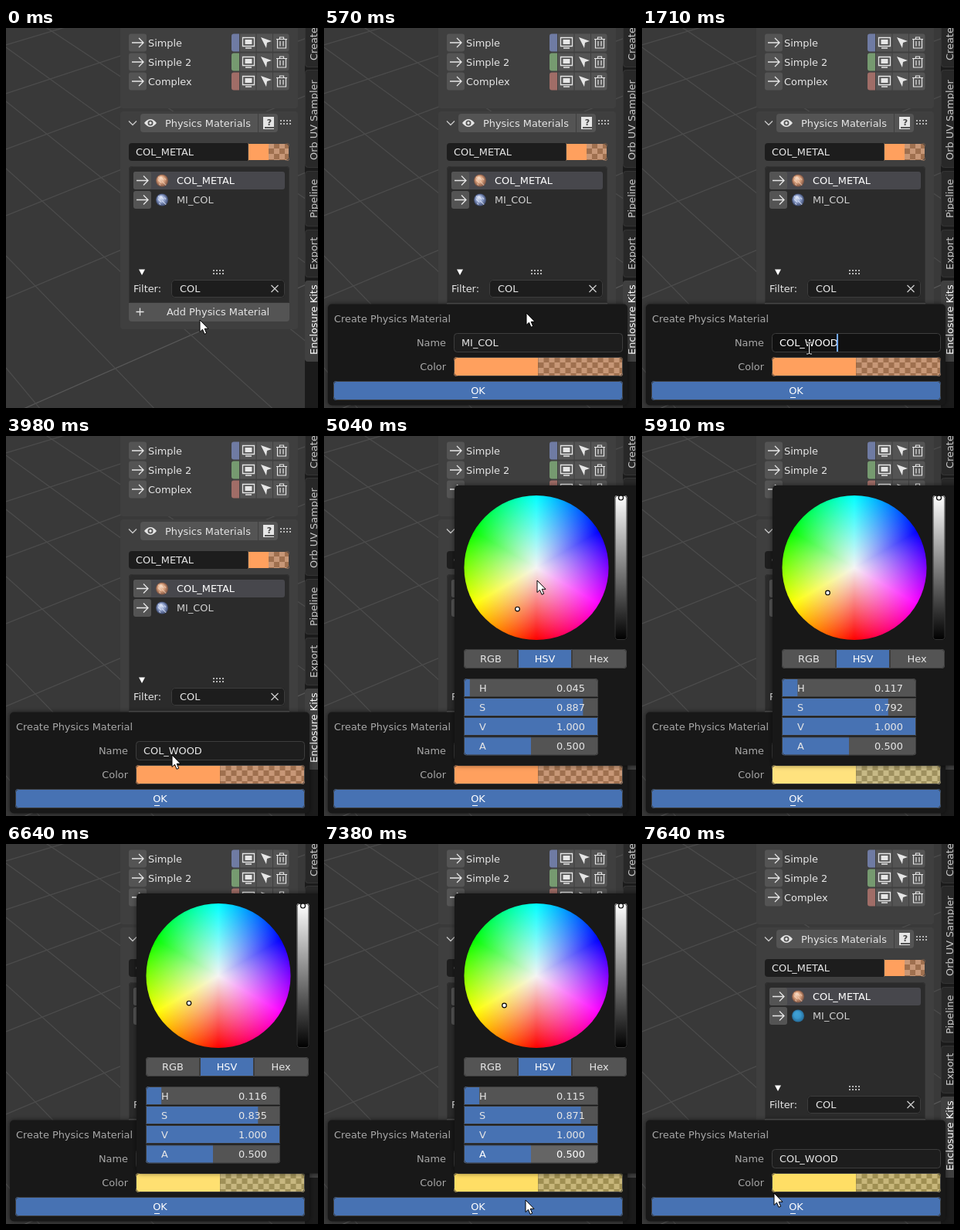
Write an HTML page with a canvas that moves like this. It is 404 by 492 pixels and loops after 8 s.

```html
<!DOCTYPE html>
<html lang="en">
<head>
<meta charset="utf-8">
<title>Create physics material</title>
<style>
html, body { margin: 0; width: 100%; height: 100%; overflow: hidden; background: #393939; }
canvas { display: block; }
</style>
</head>
<body>
<canvas id="stage" width="404" height="492"></canvas>
<script>
const ctx = document.getElementById('stage').getContext('2d');
const LOOP = 8000;
const BLUE = '#4772b3', BUTTON = '#545454', FIELD = '#1d1d1d', OUTLINE = '#3d3d3d';
const TEXT = '#e6e6e6', DIM = '#a8a8a8';
const METAL = { h: .045, s: .887 };

// Each row: start time, values
const cursorSteps = [
  [0, 'arrow', 251, 378], [170, 'arrow', 250, 375], [440, 'arrow', 262, 369],
  [1240, 'arrow', 200, 452], [1440, 'beam', 272, 424], [1710, 'beam', 216, 414],
  [3980, 'arrow', 215, 413], [4640, 'arrow', 213, 435], [5040, 'arrow', 276, 187],
  [5640, 'none'], [7380, 'arrow', 261, 461], [7580, 'arrow', 215, 457], [7640, 'arrow', 171, 452]
];
const colorSteps = [
  [0, .045, .887], [5640, .058, .87], [5710, .075, .85], [5780, .091, .83], [5840, .105, .81],
  [5910, .117, .792], [5980, .119, .785], [6110, .117, .8], [6640, .116, .835], [6780, .115, .871]
];
const nameSteps = [[0, 'MI_COL'], [1440, 'C'], [1710, 'COL_WOOD']];
const at = (steps, t) => steps.findLast(step => step[0] <= t).slice(1);

// Linear-light hue and saturation at full value, as display RGB in 0..1
function displayRgb({ h, s }) {
  const g = 1 - s * (1 - h * 6), b = 1 - s;
  return [1, g, b].map(v => 1.055 * v ** (1 / 2.4) - .055);
}
const css = rgb => `rgb(${rgb.map(v => Math.round(v * 255))})`;

function box(x, y, w, h, fill, radius = 0, stroke) {
  ctx.beginPath();
  ctx.roundRect(x, y, w, h, radius);
  ctx.fillStyle = fill;
  ctx.fill();
  if (stroke) outline(x, y, w, h, radius, stroke);
}

function outline(x, y, w, h, radius, stroke) {
  ctx.beginPath();
  ctx.roundRect(x + .5, y + .5, w - 1, h - 1, radius);
  ctx.strokeStyle = stroke;
  ctx.lineWidth = 1;
  ctx.stroke();
}

function label(text, x, y, color = TEXT, align = 'left') {
  ctx.font = '12.9px "DejaVu Sans", sans-serif';
  ctx.textAlign = align;
  ctx.fillStyle = color;
  ctx.fillText(text, x, y);
}

function shape(path, x, y, { fill, stroke, width = 1.3 }) {
  ctx.save();
  ctx.translate(x, y);
  const p = new Path2D(path);
  if (fill) { ctx.fillStyle = fill; ctx.fill(p); }
  if (stroke) { ctx.strokeStyle = stroke; ctx.lineWidth = width; ctx.stroke(p); }
  ctx.restore();
}

function disc(x, y, r, fill, stroke, width = 1) {
  ctx.beginPath();
  ctx.arc(x, y, r, 0, 7);
  ctx.fillStyle = fill;
  ctx.fill();
  if (stroke) { ctx.strokeStyle = stroke; ctx.lineWidth = width; ctx.stroke(); }
}

function swatch(x, y, w, h, rgb, corners) {
  const half = w / 2, cell = 7, mix = grey => css(rgb.map(v => (v + grey) / 2));
  ctx.save();
  ctx.beginPath();
  ctx.roundRect(x, y, w, h, corners);
  ctx.clip();
  box(x, y, half, h, css(rgb));
  box(x + half, y, half, h, mix(.25));
  for (let j = 0; j * cell < h; j++)
    for (let i = j % 2; i * cell < half; i += 2) box(x + half + i * cell, y + j * cell, cell, cell, mix(.56));
  ctx.restore();
  outline(x, y, w, h, corners, OUTLINE);
}

function dots(x, y) {
  for (let i = 0; i < 8; i++) box(x + (i % 4) * 4, y + (i >> 2) * 4, 2, 2, '#b5b5b5');
}

function arrowButton(x, y) {
  box(x, y - 11.5, 23, 23, BUTTON, 3);
  shape('M-8 0H7M1-6L7 0 1 6', x + 12, y, { stroke: TEXT });
}

function viewport() {
  box(0, 0, 404, 492, '#393939');
  ctx.lineWidth = 1.2;
  const line = (y, slope, color = '#4c4c4c') => {
    ctx.strokeStyle = color;
    ctx.beginPath();
    ctx.moveTo(0, y);
    ctx.lineTo(404, y + 404 * slope);
    ctx.stroke();
  };
  [[22, -.3], [85, -.33], [157, -.37], [243, -.4], [350, -.42], [503, -.44, '#585858']].forEach(l => line(...l));
  [[-35, .66], [25, .72], [95, .8], [182, .9], [295, 1.03], [440, 1.2]].forEach(l => line(...l));
}

function sideTabs() {
  box(387, 0, 17, 492, '#1b1b1b');
  const tabs = [['Create', 42, -9, 51], ['Orb UV Sampler', 171, 54, 181], ['Pipeline', 246, 185, 257],
    ['Export', 313, 261, 323], ['Enclosure Kits', 423, 327, 432]];
  tabs.forEach(([name, base, top, bottom], i) => {
    const active = i === 4;
    box(387, top, 24, bottom - top, active ? '#404040' : '#282828', 4, active ? '#404040' : '#343434');
    ctx.save();
    ctx.translate(403, base);
    ctx.rotate(-Math.PI / 2);
    label(name, 0, 0, active ? '#fff' : '#c8c8c8');
    ctx.restore();
  });
}

function colliderRow(name, y, color) {
  arrowButton(159, y);
  label(name, 184, y + 5);
  box(292, y - 11.5, 10, 23, color, [3, 0, 0, 3]);
  for (let i = 0; i < 3; i++) box(303 + i * 21.5, y - 11.5, 20.5, 23, BUTTON, i === 2 ? [0, 3, 3, 0] : 0);
  shape('M-7.5-6.5H7.5V4.5H-7.5ZM-4 7H4', 314, y, { stroke: TEXT });
  shape('M-4.5-4H4.5V2H-4.5Z', 314, y, { fill: TEXT });
  shape('M-6-7L8-2 2 0 1 7Z', 336, y, { fill: TEXT });
  shape('M-7-4.5H7M-2.5-4.5V-7H2.5V-4.5M-5.5-4.5V7H5.5V-4.5M-2-2V4.5M2-2V4.5', 357, y, { stroke: TEXT, width: 1.2 });
}

function sphere(y, light, mid, dark, speck) {
  const g = ctx.createRadialGradient(200, y - 3, 1, 202, y, 8);
  [light, mid, dark].forEach((c, i) => g.addColorStop(i / 2, c));
  disc(202, y, 8, g);
  for (let i = 0; speck && i < 18; i++) box(197 + (i * 3) % 10, y - 5 + (i * 7) % 11, 1.3, 1.3, speck);
}

function panel(t) {
  box(148, 0, 230, 104, '#3f3f3f', [0, 0, 4, 4]);
  box(148, 108, 230, 282, '#3f3f3f', 4);
  colliderRow('Simple', 19, '#6f7ba3');
  colliderRow('Simple 2', 44, '#769a70');
  colliderRow('Complex', 69, '#a06d67');

  shape('M-5-2.5L0 2.5 5-2.5', 164, 123, { stroke: '#c8c8c8' });
  box(174, 111, 152, 24, BUTTON, [4, 0, 0, 4]);
  shape('M-8 0Q0-10 8 0Q0 10-8 0Z', 187, 123, { fill: TEXT });
  disc(187, 123, 3.5, BUTTON);
  disc(187, 123, 1.7, TEXT);
  label('Physics Materials', 206, 128);
  box(327, 111, 25, 24, BUTTON, [0, 4, 4, 0]);
  shape('M-7-8H7V5H-5V7H7V8H-7Z', 340, 123, { fill: TEXT });
  ctx.font = 'bold 11px "DejaVu Sans", sans-serif';
  ctx.textAlign = 'center';
  ctx.fillStyle = '#454545';
  ctx.fillText('?', 341, 126);
  dots(355, 119);

  swatch(313, 149, 54, 23, displayRgb(METAL), [0, 4, 4, 0]);
  box(159, 149, 154, 23, FIELD, [4, 0, 0, 4]);
  label('COL_METAL', 168, 165);

  box(159, 179, 208, 177, '#2b2b2b', [4, 4, 0, 0], '#333');
  box(165, 186, 196, 23, '#47474c', 3);
  arrowButton(165, 197.5);
  arrowButton(165, 222.5);
  sphere(197.5, '#f3d3bb', '#d9a07c', '#7d5240', '#ffe6d290');
  if (t < 7580) sphere(222.5, '#d5def2', '#8ea0cb', '#3c4a70', '#e8efffc0');
  else sphere(222.5, '#3fa0d4', '#3a98cc', '#256b98');
  label('COL_METAL', 221, 202, '#fff');
  label('MI_COL', 221, 227, '#d0d0d0');
  shape('M-4-3.5H4L0 4Z', 176, 316, { fill: '#fff' });
  dots(268, 313);
  label('Filter:', 165, 342);
  box(214, 326, 147, 23, FIELD, 4, OUTLINE);
  label('COL', 225, 342);
  shape('M-4.5-4.5L4.5 4.5M4.5-4.5L-4.5 4.5', 348, 337.5, { stroke: '#ccc' });

  const pressed = t >= 170;
  box(159, 356, 208, 24, pressed ? '#585858' : BUTTON, [0, 0, 4, 4]);
  shape('M-5 0H5M0-5V5', 173.5, 367.5, { stroke: pressed ? '#fff' : TEXT });
  label('Add Physics Material', 208, 372, pressed ? '#fff' : TEXT);
}

function popupFrame(x, y, w, h) {
  ctx.save();
  ctx.shadowColor = '#0008';
  ctx.shadowBlur = 6;
  box(x, y, w, h, '#181818', 5);
  ctx.restore();
}

function dialog(t, rgb) {
  popupFrame(5, 357.5, 388, 131);
  label('Create Physics Material', 13, 381, DIM);
  label('Name', 158, 412, DIM, 'right');
  label('Color', 158, 443, DIM, 'right');

  const editing = t >= 1440 && t < 3980, hover = t >= 4040 && t < 4640;
  const [name] = at(nameSteps, t);
  box(168, 395, 219, 25, editing ? '#111' : hover ? '#232323' : FIELD, 4, OUTLINE);
  label(name, 178, 412, editing || hover ? '#fff' : TEXT);
  if (editing) box(177 + Math.floor(ctx.measureText(name).width), 396, 2, 23, '#71a8ff');

  swatch(168, 426, 219, 25, rgb, 4);
  box(12, 457, 375, 25, BLUE, 4, OUTLINE);
  label('OK', 199.5, 474, '#fff', 'center');
  box(192, 478, 7, 1, '#fff');
}

function slider(name, y, value, radius, hover) {
  const x = 181, w = 174, h = 24;
  ctx.save();
  ctx.beginPath();
  ctx.roundRect(x, y, w, h, radius);
  ctx.clip();
  box(x, y, w, h, hover ? '#656565' : BUTTON);
  box(x, y, w * value, h, BLUE);
  ctx.restore();
  outline(x, y, w, h, radius, OUTLINE);
  label(name, 201, y + 16.5, hover ? '#fff' : TEXT);
  label(value.toFixed(3), 338, y + 16.5, hover ? '#fff' : TEXT, 'right');
}

function picker(t, h, s, rgb) {
  popupFrame(169, 64, 250, 362.5);
  const cx = 275, cy = 170.5, radius = 93.5;
  const hues = ctx.createConicGradient(Math.PI / 2, cx, cy);
  for (let i = 0; i <= 6; i++) hues.addColorStop(i / 6, `hsl(${i * 60} 100% 50%)`);
  disc(cx, cy, radius, hues);
  const white = ctx.createRadialGradient(cx, cy, 0, cx, cy, radius);
  white.addColorStop(0, '#f4f4f4');
  white.addColorStop(1, '#f4f4f400');
  disc(cx, cy, radius, white);

  const [r, g, b] = rgb;
  const angle = (g - b) / (r - b) * Math.PI / 3, reach = (1 - b) * radius;
  disc(cx - Math.sin(angle) * reach, cy + Math.cos(angle) * reach, 2.8, '#fff', '#000', 1.2);

  const values = ctx.createLinearGradient(0, 77, 0, 264);
  values.addColorStop(0, '#fff');
  values.addColorStop(1, '#000');
  box(376.5, 77, 16, 187, values, 3, '#333');
  disc(384.5, 80, 3, '#fff', '#000', 1.2);

  ['RGB', 'HSV', 'Hex'].forEach((name, i) => {
    const corners = [[4, 0, 0, 4], 0, [0, 4, 4, 0]][i];
    box(181 + i * 70, 276, i < 2 ? 70 : 71, 25, i === 1 ? BLUE : BUTTON, corners, OUTLINE);
    label(name, 216 + i * 70, 293, i === 1 ? '#fff' : TEXT, 'center');
  });
  slider('H', 314, h, [4, 4, 0, 0]);
  slider('S', 339, s, 0);
  slider('V', 364, 1, 0);
  slider('A', 389.5, .5, [0, 0, 4, 4], t >= 7380);
}

function cursor(kind, x, y) {
  if (kind === 'arrow')
    shape('M0 0V15.5L3.5 12.3 6 18.3 8.7 17.2 6.2 11.3H11Z', x, y, { fill: '#fff', stroke: '#000', width: 1 });
  if (kind === 'beam') {
    const path = 'M-3.5-7.5H-1L0-6.5 1-7.5H3.5M0-6.5V6.5M-3.5 7.5H-1L0 6.5 1 7.5H3.5';
    shape(path, x + .5, y + .5, { stroke: '#000', width: 3 });
    shape(path, x + .5, y + .5, { stroke: '#fff', width: 1 });
  }
}

function draw(now) {
  const t = now % LOOP;
  const [h, s] = at(colorSteps, t), rgb = displayRgb({ h, s });
  viewport();
  sideTabs();
  panel(t);
  if (t >= 440) dialog(t, rgb);
  if (t >= 5040 && t < 7580) picker(t, h, s, rgb);
  cursor(...at(cursorSteps, t));
}

const start = performance.now();
function tick() {
  draw(performance.now() - start);
  requestAnimationFrame(tick);
}
tick();
</script>
</body>
</html>
```
